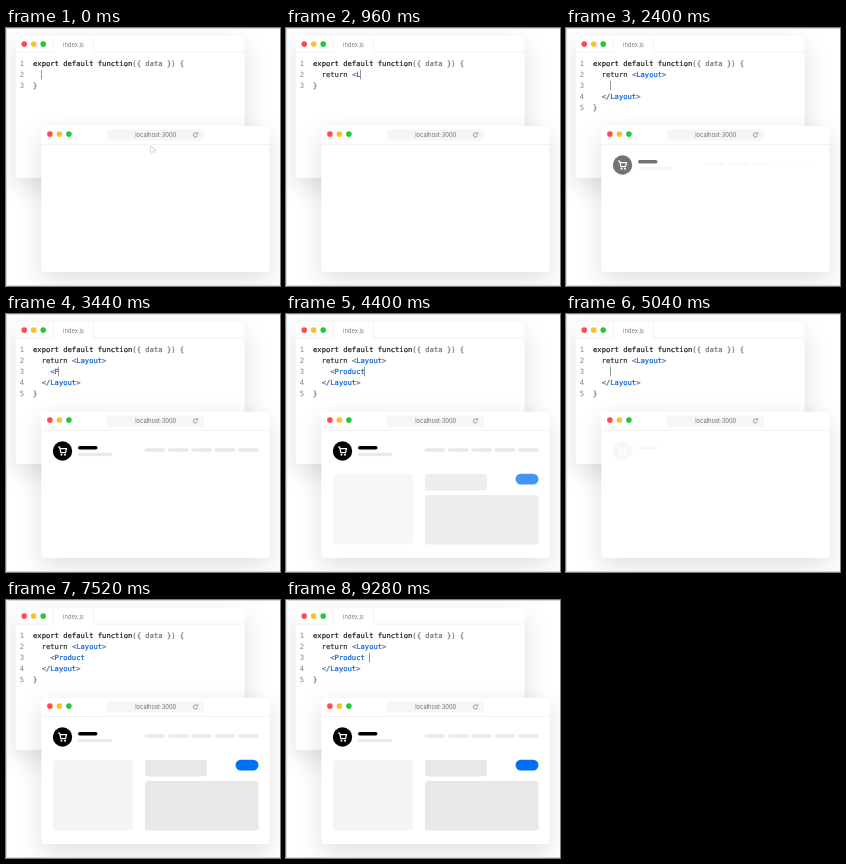
These frames come from a looping animation (274x258 px, 9.52 s). An HTML page with a canvas:

```html
<!DOCTYPE html>
<html lang="en">
<head>
<meta charset="utf-8">
<title>Live editing</title>
<style>
  html, body { margin: 0; width: 100%; height: 100%; overflow: hidden; background: #fff; }
  canvas { display: block; width: 274px; height: 258px; }
</style>
</head>
<body>
<canvas id="stage"></canvas>
<script>
const W = 274, H = 258, LOOP = 9520, STEP = 80;
const CHAR = 4.32, CODE_X = 27, LINE = 11, BASE = 38.3;
const INK = '#1c1c1c', SOFT = '#707070', BLUE = '#0b62d0', BONE = '#e9e9e9';
const MONO = '7.18px "DejaVu Sans Mono", monospace';
const SANS = '5.8px Inter, sans-serif';
const BLINKS = [5520, 5920, 6480, 7040, 7520, 8000, 8560, 9040];

const canvas = document.getElementById('stage');
const ctx = canvas.getContext('2d');
const dpr = window.devicePixelRatio || 1;
canvas.width = W * dpr;
canvas.height = H * dpr;

const clamp = (v, lo, hi) => Math.min(hi, Math.max(lo, v));
const typed = (t, start, pace, max) => clamp(Math.floor((t - start) / pace) + 1, 0, max);

function fade(t, start, length) {
  const p = clamp((t - start) / length, 0, 1);
  return p * p * (3 - 2 * p);
}

// The edit plays once, is undone quickly, then redone.
function storyTime(t) {
  const keys = [[0, 0], [4640, 4640], [5040, 2160], [5120, 3440], [5360, 4700], [LOOP, 8860]];
  const i = keys.findIndex(k => t < k[0]);
  const [t0, s0] = keys[i - 1], [t1, s1] = keys[i];
  return s0 + (s1 - s0) * (t - t0) / (t1 - t0);
}

function box(x, y, w, h, r, color) {
  ctx.fillStyle = color;
  ctx.beginPath();
  ctx.roundRect(x, y, w, h, r);
  ctx.fill();
}

function dot(x, y, r, color) {
  ctx.fillStyle = color;
  ctx.beginPath();
  ctx.arc(x, y, r, 0, 7);
  ctx.fill();
}

function stroke(points, color, width) {
  ctx.strokeStyle = color;
  ctx.lineWidth = width;
  ctx.beginPath();
  points.forEach(([x, y]) => ctx.lineTo(x, y));
  ctx.stroke();
}

function label(text, x, y, color, font = SANS, align = 'left') {
  ctx.font = font;
  ctx.textAlign = align;
  ctx.fillStyle = color;
  ctx.fillText(text, x, y);
}

// Code is set slightly heavier than the regular weight.
function code(text, x, y, color) {
  label(text, x, y, color, MONO);
  ctx.strokeStyle = color;
  ctx.lineWidth = .2;
  ctx.strokeText(text, x, y);
}

function frame(x, y, w, h) {
  ctx.save();
  ctx.shadowColor = 'rgba(0,0,0,.13)';
  ctx.shadowBlur = 26 * dpr;
  ctx.shadowOffsetY = 8 * dpr;
  box(x, y, w, h, 4, '#fff');
  ctx.restore();
  ['#ff4b4b', '#ffbe2e', '#24c840'].forEach((c, i) => dot(x + 8.6 + i * 9.5, y + 8.1, 2.8, c));
}

// Tokens are [text, color] pairs on a fixed character grid.
function codeLine(row, col, tokens) {
  for (const [text, color] of tokens) {
    code(text, CODE_X + col * CHAR, BASE + row * LINE, color);
    col += text.length;
  }
  return col;
}

function tag(text) {
  return text.split(/([<>\/]+)/).filter(Boolean)
    .map(part => [part, /[<>\/]/.test(part) ? '#4d6484' : BLUE]);
}

function caret(row, col) {
  const x = Math.floor(CODE_X + col * CHAR) + .5, y = BASE + row * LINE;
  stroke([[x, y - 7.5], [x, y + 2]], '#959595', 1);
}

function editor(s, t) {
  frame(9.6, 8, 229, 142);
  stroke([[9.6, 24], [47.5, 24], [47.5, 9]], '#f2f2f2', 1);
  stroke([[87.5, 9], [87.5, 24], [238.6, 24]], '#f2f2f2', 1);
  label('index.js', 57, 18.6, '#84807c');

  const split = s >= 1680;
  for (let i = 0; i < (split ? 5 : 3); i++) {
    label(String(i + 1), 13.8, BASE + i * LINE, '#808080', MONO);
  }
  codeLine(0, 0, [['export default function', INK], ['({ data }) {', SOFT]]);

  const ret = 'return '.slice(0, typed(s, 160, 80, 7));
  const open = '<Layout>'.slice(0, typed(s, 880, 80, 8));
  const end = codeLine(1, 2, [[ret, '#333'], ...tag(open)]);
  const close = tag('</Layout>');
  const hidden = BLINKS.filter(b => b <= t).length % 2;

  if (!split) {
    if (s >= 1440) codeLine(1, end, close);
    codeLine(2, 0, [['}', SOFT]]);
    caret(1, end);
    return;
  }
  const product = '<Product'.slice(0, typed(s, 3280, 110, 8));
  const col = codeLine(2, 4, tag(product)) + (t >= 9280 ? 1 : 0);
  codeLine(3, 2, close);
  codeLine(4, 0, [['}', SOFT]]);
  if (!hidden) caret(2, col);
}

function reloadIcon(x, y) {
  ctx.strokeStyle = '#777';
  ctx.lineWidth = .7;
  ctx.beginPath();
  ctx.arc(x, y, 2.1, .3, 5.4);
  ctx.stroke();
  stroke([[x + 2.2, y - 2.7], [x + 2.2, y - 1], [x + .5, y - 1]], '#777', .7);
}

function cart(x, y) {
  stroke([[x - 4.6, y - 4], [x - 2.9, y - 4], [x - 1.6, y + 1.6], [x + 3, y + 1.6],
    [x + 4, y - 2.3], [x - 2.4, y - 2.3]], '#fff', 1.2);
  dot(x - 1, y + 3.8, 1, '#fff');
  dot(x + 2.5, y + 3.8, 1, '#fff');
}

function pageHeader(s) {
  ctx.globalAlpha = fade(s, 2100, 560);
  dot(56.5, 137, 9.7, '#000');
  box(72, 132, 19.5, 3.4, 1.7, '#000');
  ctx.globalAlpha = s > 2100 ? 1 : 0;
  cart(56.5, 137);
  ctx.globalAlpha = fade(s, 2160, 560);
  box(72, 138.8, 34, 3.4, 1.7, BONE);
  for (let i = 0; i < 5; i++) {
    ctx.globalAlpha = fade(s, 2200 + i * 30, 560);
    box(138.5 + i * 23.4, 134.3, 20.5, 3.4, 1.7, BONE);
  }
  ctx.globalAlpha = 1;
}

function pageProduct(s) {
  ctx.globalAlpha = fade(s, 4080, 480);
  box(47, 160, 80, 70.5, 3, '#f5f5f5');
  box(139, 160, 62, 16.5, 3, '#e8e8e8');
  box(139, 181, 113.5, 49.5, 3, '#e8e8e8');
  box(229.5, 159.7, 23, 10.8, 5.4, '#0070f3');
  ctx.globalAlpha = 1;
}

function pointer(t) {
  ctx.globalAlpha = 1 - fade(t, 0, 400);
  ctx.fillStyle = '#fff';
  stroke([[145, 118.2], [145, 124.3], [146.5, 123], [147.6, 125.2], [148.6, 124.7],
    [147.6, 122.6], [149.4, 122.4], [145, 118.2]], '#999', .7);
  ctx.fill();
  ctx.globalAlpha = 1;
}

function browser(s, t) {
  frame(35.3, 98, 228.2, 146);
  stroke([[35.3, 116.5], [263.5, 116.5]], '#f3f3f3', 1);
  box(101, 101.5, 97, 11, 2.5, '#f6f6f6');
  label('localhost:3000', 149.7, 109.2, '#707070', SANS, 'center');
  reloadIcon(189.5, 107);
  pageHeader(s);
  pageProduct(s);
  if (t < 400) pointer(t);
}

function draw(now) {
  const t = Math.floor(now % LOOP / STEP) * STEP;
  const s = storyTime(t);
  ctx.setTransform(dpr, 0, 0, dpr, 0, 0);
  ctx.fillStyle = '#fff';
  ctx.fillRect(0, 0, W, H);
  editor(s, t);
  browser(s, t);
  stroke([[W, .5], [.5, .5], [.5, H - .5], [W, H - .5]], '#d8d8d8', 1);
}

const start = performance.now();
function tick() {
  draw(performance.now() - start);
  requestAnimationFrame(tick);
}
tick();
</script>
</body>
</html>
```
